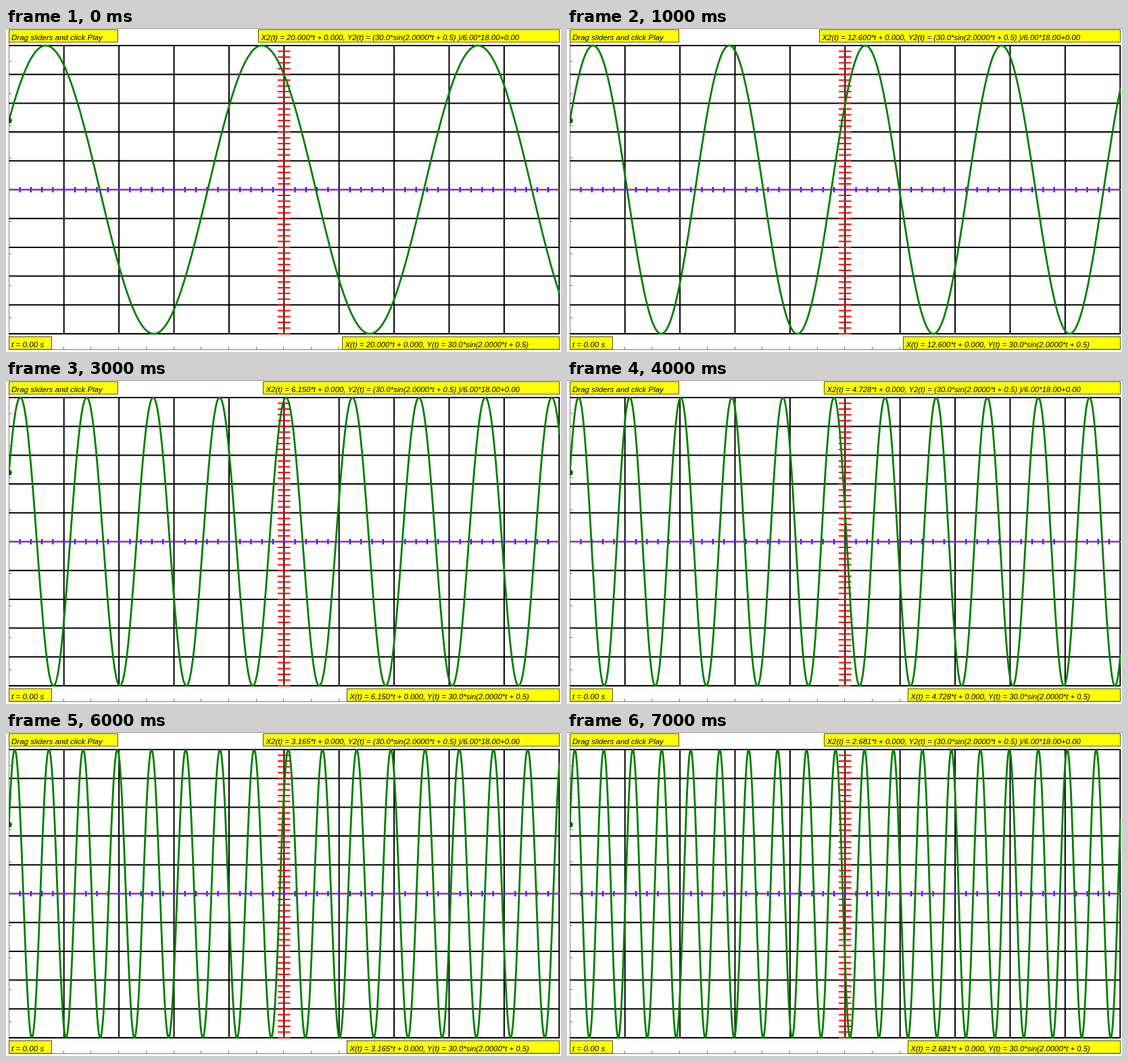
Animation, 821 px wide and 480 px high, one loop 8000 ms. Source, as an HTML page:

```html
<!DOCTYPE html>
<html lang="en">
<head>
<meta charset="utf-8">
<title>Sine plot</title>
<style>
html, body { margin: 0; width: 100%; height: 100%; overflow: hidden; background: #fff; }
svg { display: block; width: 821px; height: 480px; }
text { font-family: "Liberation Sans", Arial, sans-serif; font-style: italic; font-size: 11.35px; fill: #000; white-space: pre; }
path { fill: none; }
.box { fill: #ff0; stroke: #550; stroke-width: 1; }
</style>
</head>
<body>
<svg viewBox="0 0 821 480">
  <defs><clipPath id="area"><rect x="4" y="24" width="815" height="431"/></clipPath></defs>
  <rect width="821" height="480" fill="#fff"/>
  <path d="M0 .5H821" stroke="#888"/>
  <path id="frame" stroke="#8a7676"/>
  <path id="grid" stroke="#000" stroke-width="2"/>
  <path id="yTicks" stroke="#f00" stroke-width="2"/>
  <path id="xTicks" stroke="#00f" stroke-width="2"/>
  <path d="M4 239.5H819" stroke="#f0f" stroke-width="1.6"/>
  <g clip-path="url(#area)">
    <path id="curve" stroke="#008000" stroke-width="2.8" stroke-linejoin="round"/>
    <circle id="dot" r="4.5" fill="#006400"/>
  </g>
  <rect class="box" x="4.5" y="2.5" width="161" height="18.5"/>
  <text x="8" y="17.5" style="font-size:11.5px">Drag sliders and click Play</text>
  <rect class="box" x="4.5" y="457.5" width="63" height="18.5"/>
  <text x="8" y="472.5" style="font-size:11.7px">t = 0.00 s</text>
  <rect class="box" id="topBox" y="2.5" height="18.5"/>
  <text id="topText" y="17.5"></text>
  <rect class="box" id="lowBox" y="457.5" height="18.5"/>
  <text id="lowText" y="472.5"></text>
</svg>
<script>
const $ = id => document.getElementById(id);
const set = (id, name, value) => $(id).setAttribute(name, value);
const left = 4.3, right = 818.3, mid = 239.5, amp = 213.5;
const col = (right - left) / 10, row = amp / 5;
const speeds = [20, 12.6, 8.584, 6.15, 4.728, 3.861, 3.165, 2.681];
const omega = 2, phase = 0.5;
const wave = t => mid - amp * Math.sin(omega * t + phase);
const lines = (from, to, f) => {
  let d = '';
  for (let i = from; i <= to; i++) d += f(i);
  return d;
};

set('grid', 'd',
  lines(1, 10, i => `M${left + i * col} 26V453`) +
  lines(0, 10, i => `M${left} ${26 + i * row}H819`));
set('yTicks', 'd', lines(1, 50, i => `M402 ${26 + i * row / 5}h18.5`));
set('xTicks', 'd', lines(1, 49, i => `M${left + i * col / 5} 235.5v8`));
set('frame', 'd', 'M4.5 2V476.5H819' +
  lines(1, 9, i => `M4.5 ${Math.round(2 + i * 47.4) + 0.5}h4`) +
  lines(1, 20, i => `M${Math.round(left + i * col / 2) - 0.5} 472v4`));
set('dot', 'cx', left);
set('dot', 'cy', wave(0));

function label(name, x, text) {
  set(name + 'Box', 'x', x + 0.5);
  set(name + 'Box', 'width', 818 - x);
  set(name + 'Text', 'x', x + 4.5);
  $(name + 'Text').textContent = text;
}

let shown = -1;
function draw(step) {
  if (step === shown) return;
  shown = step;
  const v = speeds[step], unit = (right - left) / 160;
  let d = '';
  for (let x = left; x <= right + 0.6; x += 0.5) {
    d += (d ? 'L' : 'M') + x.toFixed(1) + ' ' + wave((x - left) / unit / v).toFixed(2);
  }
  set('curve', 'd', d);
  const shift = v < 10 ? 7 : 0, speed = v.toFixed(3);
  const sine = '30.0*sin(2.0000*t + 0.5)';
  label('top', 373 + shift, `X2(t) = ${speed}*t + 0.000, Y2(t) = (${sine} )/6.00*18.00+0.00`);
  label('low', 497 + shift, `X(t) = ${speed}*t + 0.000, Y(t) = ${sine}`);
}

const start = performance.now();
function tick() {
  const ms = Math.max(0, performance.now() - start) % 8000;
  draw(Math.floor(ms / 1000));
  requestAnimationFrame(tick);
}
draw(0);
tick();
</script>
</body>
</html>
```
